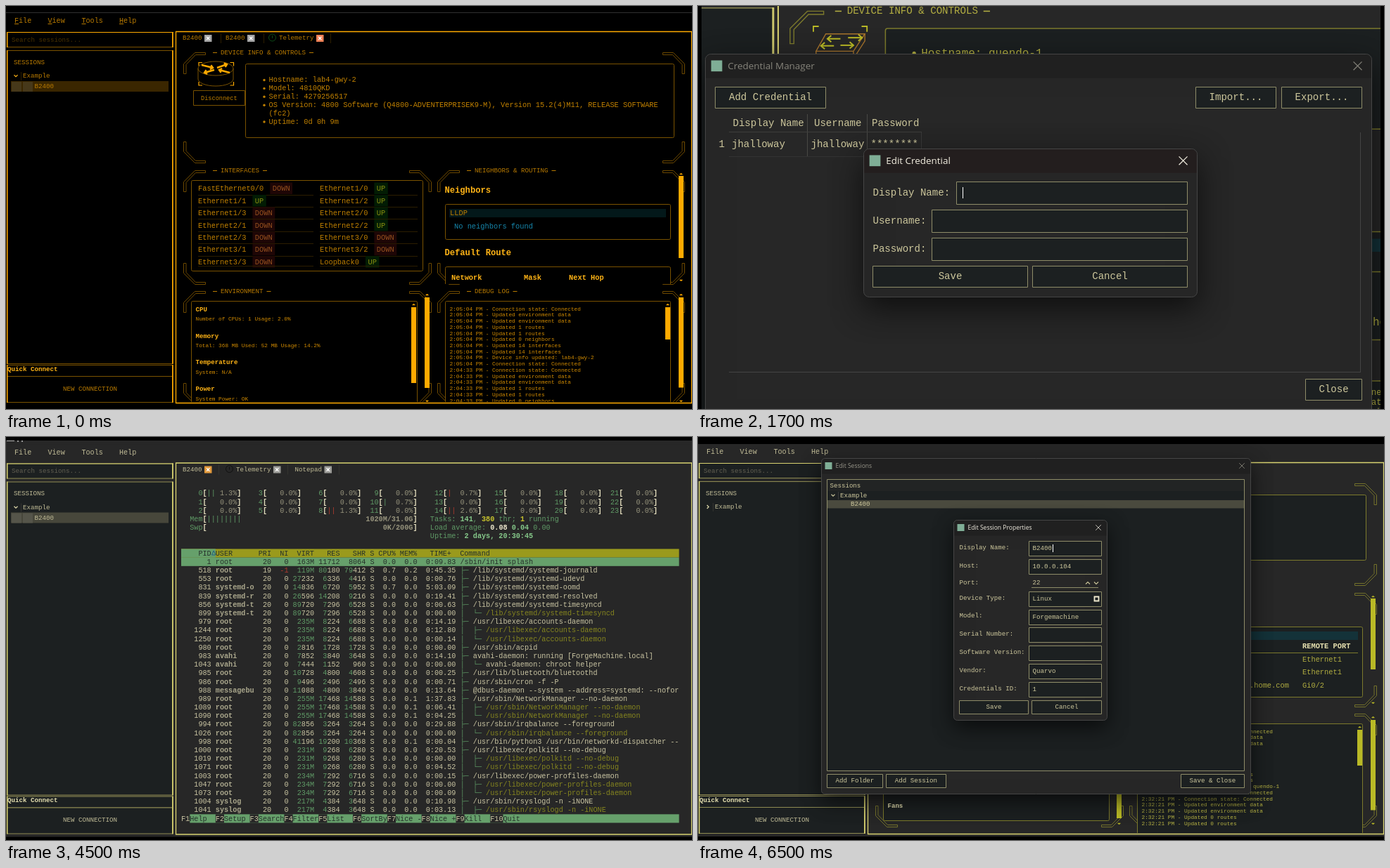
An HTML page with a canvas for the animation above (8 s loop, 975 px wide and 574 px high).

```html
<!DOCTYPE html>
<html lang="en">
<head>
<meta charset="utf-8">
<title>Terminal telemetry</title>
<style>
html, body { margin: 0; width: 100%; height: 100%; overflow: hidden; background: #000; }
canvas { display: block; }
</style>
</head>
<body>
<canvas id="stage" width="975" height="574"></canvas>
<script>
const ctx = document.getElementById('stage').getContext('2d');
const MONO = '"Liberation Mono", "Courier New", monospace';
const SANS = '"Open Sans", "Noto Sans", sans-serif';

const amber = { bg: '#000', panel: '#000', frame: '#ffaa00', soft: '#7a5200', accent: '#ffaa00', dim: '#7a5200', faint: '#2c1e00',
  title: '#b87a00', text: '#b87a00', body: '#c08000', small: '#d08a00', bold: '#ffb416', hint: '#4a3200', sel: '#3a2600', selBox: '#46381a',
  strip: '#03181a', up: '#8a9010', upBg: '#021c04', down: '#96501f', downBg: '#1e0606' };
const cyan = { bg: '#000', panel: '#000', frame: '#1fc4dc', soft: '#0f6473', accent: '#22d3ee', dim: '#0f6473', faint: '#06303a',
  title: '#1590a4', text: '#1590a4', body: '#1698ac', small: '#1aa8bf', bold: '#25d6f0', hint: '#0a4650',
  strip: '#041c20', up: '#14887e', upBg: '#031a06' };
const dark = { bg: '#272727', panel: '#1c2021', frame: '#d8d270', soft: '#8e8b52', accent: '#b9b926', dim: '#7c7a2c', faint: '#343430',
  title: '#b3ae42', text: '#c0bb96', body: '#b0ac40', small: '#b8b444', bold: '#e6e0b0', hint: '#625f52', sel: '#47473b', selBox: '#55554a',
  strip: '#143239' };

function text(s, x, y, color, size = 10.37, style = '') {
  ctx.font = `${style} ${size}px ${MONO}`;
  ctx.fillStyle = color;
  ctx.fillText(s, x, y + size * 0.31);
}
const bold = (s, x, y, color, size) => text(s, x, y, color, size, 'bold');

function rect(x, y, x2, y2, color) {
  ctx.fillStyle = color;
  ctx.fillRect(x, y, x2 - x, y2 - y);
}
function box(x, y, x2, y2, stroke, fill, r = 0, w = 1) {
  ctx.beginPath();
  ctx.roundRect(x + 0.5, y + 0.5, x2 - x - 1, y2 - y - 1, r);
  if (fill) { ctx.fillStyle = fill; ctx.fill(); }
  ctx.strokeStyle = stroke;
  ctx.lineWidth = w;
  ctx.stroke();
}
function path(points, color, w = 1, closed = false, fill) {
  ctx.beginPath();
  points.forEach(([x, y]) => ctx.lineTo(x, y));
  if (closed) ctx.closePath();
  if (fill) { ctx.fillStyle = fill; ctx.fill(); }
  ctx.strokeStyle = color;
  ctx.lineWidth = w;
  ctx.stroke();
}
const hline = (x, x2, y, color) => rect(x, y, x2, y + 1, color);
const vline = (x, y, y2, color) => rect(x, y, x + 1, y2, color);
function cross(x, y, r, color, w = 1) {
  path([[x - r, y - r], [x + r, y + r]], color, w);
  path([[x - r, y + r], [x + r, y - r]], color, w);
}
function chevron(x, y, dir, color, r = 2.5) {
  const h = r / 2;
  path(dir === 'right' ? [[x - h, y - r], [x + h, y], [x - h, y + r]]
    : dir === 'up' ? [[x - r, y + h], [x, y - h], [x + r, y + h]]
    : [[x - r, y - h], [x, y + h], [x + r, y - h]], color, 1.1);
}
function clipped(x, y, x2, y2, draw) {
  ctx.save();
  ctx.beginPath();
  ctx.rect(x, y, x2 - x, y2 - y);
  ctx.clip();
  draw();
  ctx.restore();
}

// Soft frame with bright upright sides
function frame(x, y, x2, y2, t) {
  box(x, y, x2, y2, t.soft, t.panel);
  rect(x, y, x + 1.5, y2, t.frame);
  rect(x2 - 2, y, x2 - 0.5, y2, t.frame);
}

// Panel with double-line cut corners and a dashed title
function panel(x, y, x2, y2, title, t) {
  const shape = [[0, 30], [0, 16], [16, 0], [31, 0], [31, 3], [17, 3], [3.5, 17], [3.5, 30]];
  for (const [cx, sx] of [[x, 1], [x2, -1]])
    for (const [cy, sy] of [[y, 1], [y2, -1]])
      path(shape.map(([a, b]) => [cx + sx * a + 0.5, cy + sy * b + 0.5]), t.dim, 0.9, true);
  const w = title.length * 5.5, tx = x + 53;
  rect(tx - 12, y - 5, tx + w + 12, y + 5, t.bg);
  text(title, tx, y, t.title, 9.17);
  hline(tx - 11, tx - 5, y, t.title);
  hline(tx + w + 5, tx + w + 11, y, t.title);
}
function scroll(x, y, y2, t, up, down) {
  rect(x, y, x + 7, y2, t.accent);
  const tri = (cy, s) => path([[x + 1.5, cy + s], [x + 3.5, cy - s], [x + 5.5, cy + s]], t.accent, 0.5, true, t.accent);
  if (up) tri(up, 1);
  if (down) tri(down, -1);
}

function sidebar(t, s) {
  frame(1, 37, 238, 59, t);
  hline(1, 238, 37, t.frame);
  text('Search sessions...', 8, 48, t.hint, 9.17);
  frame(1, 63, 238, 510, t);
  text('SESSIONS', 11, 80, t.text, 9.17);
  chevron(14, 99.5, s.child ? 'down' : 'right', t.bold);
  vline(21, 94, 106, t.faint);
  text('Example', 24, 99.5, t.text, 9.17);
  if (s.selected) {
    rect(7, 107, 231, 122, t.sel);
    rect(8, 108, 22, 122, t.selBox);
    rect(24, 108, 38, 122, t.selBox);
  }
  if (s.child) text('B2400', 40.5, 114.5, t.text, 9.17);
  frame(1, 511, 238, 528, t);
  bold('Quick Connect', 2, 517, t.bold, 9.17);
  frame(1, 527, 238, 565, t);
  text('NEW CONNECTION', 81, 545, t.text, 9.17);
}

// Each tab: label, label x, close button colour, separator x, status dot colour
function tabs(list, t) {
  for (const [label, x, close, end, dot] of list) {
    if (dot) {
      ctx.beginPath();
      ctx.arc(x - 9.5, 45, 5, 0, 7);
      ctx.strokeStyle = dot;
      ctx.lineWidth = 1;
      ctx.stroke();
      vline(x - 10, 42, 46, dot);
    }
    text(label, x, 45.5, t.text, 9.17);
    const cx = x + label.length * 5.5 + 3.5;
    rect(cx, 41, cx + 10.5, 51, close);
    cross(cx + 5.2, 46, 2.2, '#fff', 1.3);
    vline(end, 39, 53, t.faint);
  }
}

function arrow(x, x2, y, color, w) {
  const d = Math.sign(x2 - x) * 3.5;
  path([[x, y], [x2, y]], color, w);
  path([[x2 - d, y - 3], [x2, y], [x2 - d, y + 3]], color, w);
}
function deviceIcon(t, router) {
  for (const [x, sx] of [[274, 1], [323.5, -1]])
    for (const [y, sy] of [[80.5, 1], [113, -1]])
      path([[x, y + sy * 5], [x, y], [x + sx * 5, y]], t.accent, 1.2);
  if (router) {
    ctx.beginPath();
    ctx.ellipse(298, 89, 25, 10, 0, 0, 7);
    ctx.moveTo(273, 89);
    ctx.lineTo(273, 104);
    ctx.ellipse(298, 104, 25, 10, 0, Math.PI, 0, true);
    ctx.lineTo(323, 89);
    ctx.strokeStyle = t.dim;
    ctx.lineWidth = 1;
    ctx.stroke();
    for (const [x, y, x2, y2] of [[278, 84, 294, 88], [300, 88, 314, 83], [296, 91, 282, 95], [318, 95, 303, 91]]) {
      ctx.save();
      ctx.translate(x, y);
      ctx.rotate(Math.atan2(y2 - y, x2 - x));
      arrow(0, Math.hypot(x2 - x, y2 - y), 0, t.accent, 2.4);
      ctx.restore();
    }
    return;
  }
  const edge = t === dark ? '#a8742c' : t.accent;
  path([[285.5, 87.5], [321.5, 87.5], [311, 103.5], [276.5, 103.5]], edge, 0.9, true);
  path([[276.5, 103.5], [276.5, 110.5], [311, 110.5], [321.5, 94], [321.5, 87.5]], edge, 0.9);
  path([[311, 103.5], [311, 110.5]], edge, 0.9);
  arrow(299, 287, 92, t.accent, 1.3);
  arrow(306, 319, 91, t.accent, 1.3);
  arrow(293, 281, 98.5, t.accent, 1.3);
  arrow(299, 311, 98, t.accent, 1.3);
}

function device(t, s) {
  panel(252, 66, 964, 223 + s.shift, 'DEVICE INFO & CONTROLS', t);
  deviceIcon(t, s.router);
  box(266, 120, 340, 142, t.dim, t.panel);
  text('Disconnect', 277, 131, t.body, 8.6);
  box(340, 82, 950, 188 + s.shift, t.dim, t.panel, 2);
  s.info.forEach((line, i) => {
    const y = 105 + i * 11.9;
    if (line[0] !== ' ') {
      ctx.beginPath();
      ctx.arc(367, y + 0.5, 1.7, 0, 7);
      ctx.fillStyle = t.body;
      ctx.fill();
    }
    text(line.trim(), 373.5, y, t.body);
  });
}

function interfaces(t, s) {
  panel(252, 234, 604, 396, 'INTERFACES', t);
  if (!s.ports) return;
  const rows = Math.ceil(s.ports.length / 2);
  box(263, 248, 593, s.portEnd, t.dim, t.panel, 2);
  s.ports.forEach(([name, up], i) => {
    const [x, x2] = s.portCols[i % 2], y = 260 + (i >> 1) * 17.45;
    const bx = x + (name.length + 2) * 6.22, label = up ? 'UP' : 'DOWN';
    text(name, x, y, t.body);
    rect(bx - 3.5, y - 8.5, bx + label.length * 6.22 + 3.5, y + 8, up ? t.upBg : t.downBg);
    text(label, bx, y, up ? t.up : t.down);
    hline(x, x2, Math.round(y + (i >> 1 === rows - 1 ? 5.5 : 8.5)), t.faint);
  });
}

function neighbors(t, s) {
  panel(613, 234, 964, 396, 'NEIGHBORS & ROUTING', t);
  clipped(614, 240, 956, 396, () => {
    bold('Neighbors', 623.5, 262.5, t.bold, 12.13);
    box(624, 282, 945, s.lldpEnd, t.dim, t.panel, 2);
    rect(630, 289, 938, 301, t.strip);
    text('LLDP', 631, 295, t.body);
    s.lldp(t);
    const y = s.lldpEnd + 18.5;
    bold('Default Route', 623.5, y, t.bold, 12.13);
    box(624, Math.round(y + 19), 945, y + 90, t.dim, t.panel, 2);
    [['Network', 633], ['Mask', 736], ['Next Hop', 800]].forEach(([h, x]) => bold(h, x, y + 35, t.bold));
  });
  scroll(956, 242, s.routeBar, t, 239, 391);
}

function logLines(s) {
  const make = time => [
    'Connection state: Connected', ...Array(2).fill('Updated environment data'),
    ...Array(2).fill(`Updated ${s.routes} routes`), ...Array(s.repeat).fill(`Updated ${s.near} neighbors`),
    ...Array(2).fill(`Updated ${s.count} interfaces`), 'Device info updated: ' + s.host, 'Connection state: Connected',
  ].map(m => `${time} PM - ${m}`);
  return s.times.flatMap(make).slice(0, 16);
}

function lowerPanels(t, s) {
  clipped(244, 398, 973, 564 - s.shift, () => {
    panel(252, 406, 604, 567, 'ENVIRONMENT', t);
    panel(613, 406, 964, 567, 'DEBUG LOG', t);
    box(263, 420, 585, s.env ? 600 : 559, t.dim, t.panel, 2);
    if (s.env) {
      s.env.forEach(([head, line], i) => {
        bold(head, 269.5, 432 + i * 37.8, t.bold, 9.07);
        text(line, 269.5, 446 + i * 37.8, t.small, 7.78);
      });
      scroll(576, 429, 537, t, 425);
    } else bold('Fans', 269.5, 537, t.bold, 9.07);
    scroll(595, 415, s.env ? 544 : 555, t, 411, 563);
    box(624, 420, 945, 600, t.dim, t.panel, 2);
    logLines(s).forEach((line, i) => text(line, 630.5, 431.3 + i * 8.72, t.small, 7.78));
    scroll(937, 429, s.logBar, t, 425);
    scroll(956, 415, 543.5, t, 411, 563);
  });
}

function shell(t, s) {
  rect(0, 10, 975, 569, t.bg);
  [['File', 12], ['View', 59.5], ['Tools', 107.5], ['Help', 161]].forEach(([m, x]) => {
    text(m, x, 21, t.text, 10.1);
    if (s.mnemonics) hline(x, x + 6, 25, t.text);
  });
  sidebar(t, s);
  box(241, 36, 975, 566, t.frame, t.bg, 0, 1.3);
  tabs(s.tabs || [], t);
}
function dashboard(t, s) {
  shell(t, s);
  device(t, s);
  ctx.save();
  ctx.translate(0, s.shift);
  interfaces(t, s);
  neighbors(t, s);
  lowerPanels(t, s);
  ctx.restore();
}

const environment = (cpu, total, used, pct) => [
  ['CPU', `Number of CPUs: 1 Usage: ${cpu}%`],
  ['Memory', `Total: ${total} MB Used: ${used} MB Usage: ${pct}%`],
  ['Temperature', 'System: N/A'], ['Power', 'System Power: OK'],
];
const ports = (list, prefix) => list.split(' ').map(p => [prefix + p.slice(0, 3), p[3] === '+']);

const routerView = {
  mnemonics: true, child: true, selected: true, router: true, shift: 0,
  tabs: [['B2400', 251, '#a5a5a5', 305], ['B2400', 312, '#a5a5a5', 366], ['Telemetry', 388, '#f08055', 461, '#0d4d18']],
  info: ['Hostname: lab4-gwy-2', 'Model: 4810QKD', 'Serial: 4279256517',
    'OS Version: 4800 Software (Q4800-ADVENTERPRISEK9-M), Version 15.2(4)M11, RELEASE SOFTWARE', ' (fc2)', 'Uptime: 0d 0h 9m'],
  ports: [['FastEthernet0/0', false], ...ports('1/0+ 1/1+ 1/2+ 1/3- 2/0+ 2/1- 2/2+ 2/3- 3/0- 3/1- 3/2- 3/3-', 'Ethernet'), ['Loopback0', true]],
  portCols: [[273, 437], [446, 585]], portEnd: 378,
  lldpEnd: 333, routeBar: 359, logBar: 475,
  lldp: () => text('No neighbors found', 637, 313.5, '#1686ab'),
  env: environment('2.0', 368, 52, '14.2'),
  times: ['2:05:04', '2:04:33'], routes: 1, near: 0, repeat: 1, count: 14, host: 'lab4-gwy-2',
};
const coreView = {
  child: true, shift: 0,
  tabs: [['Telemetry', 266.5, '#f0906c', 340, '#0d4d18']],
  info: ['Hostname: lab4-main-02', 'Model: KTRm', 'Serial: 9M2G8CK29M4',
    'OS Version: nuos_l2 Software (nuos_l2-ADVENTERPRISEK9-M), Version 15.2(4.0.55)E, TEST',
    ' ENGINEERING ESTG_WEEKLY BUILD, synced to END_OF_FLO_ISP', 'Uptime: 0d 5h 13m'],
  ports: [...ports('0/0+ 0/1+ 0/2+ 0/3+', 'GigabitEthernet'), ['Vlan1', true]],
  portCols: [[273, 425], [433, 585]], portEnd: 309,
  lldpEnd: 346, routeBar: 353, logBar: 475,
  lldp: t => {
    [['LOCAL PORT', 633.5], ['NEIGHBOR', 779.5], ['REMOTE PORT', 849]].forEach(([h, x]) => bold(h, x, 310, t.bold));
    hline(631, 938, 319, t.dim);
    [['GigabitEthernet0/2', 633.5], ['quendo-1', 779.5], ['Ethernet1', 849]].forEach(([h, x]) => text(h, x, 328.5, t.body));
  },
  env: environment('0.0', 402, 106, '26.4'),
  times: ['7:07:59', '7:07:28'], routes: 1, near: 1, repeat: 2, count: 5, host: 'lab4-main-02',
};
const switchView = {
  shift: -12,
  info: ['Hostname: quendo-1'],
  lldpEnd: 383, routeBar: 343, logBar: 480,
  lldp: t => {
    bold('REMOTE PORT', 859, 310, t.bold);
    hline(631, 938, 319, t.dim);
    ['Ethernet1', 'Ethernet1', 'Gi0/2'].forEach((p, i) => text(p, 859, 328.5 + i * 18.7, t.body));
    text('.home.com', 784, 366, t.body);
  },
  times: ['2:32:52', '2:32:21'], routes: 0, near: 3, repeat: 2, count: 14, host: 'quendo-1',
};

// Process viewer on a character grid
const GREEN = '#5f9a66', LIME = '#86c98a', OLIVE = '#85851f', PLAIN = '#c9c4a2', INK = '#25302a', RED = '#b03a2e', YELLOW = '#c9c52e';
const gx = col => 249 + col * 6.1, gy = row => 80.2 + row * 12.19;
const cell = (s, col, row, color, style) => text(s, gx(col), gy(row), color, 10.17, style);
function run(col, row, parts) {
  for (const [s, color, style] of parts) {
    cell(s, col, row, color, style);
    col += s.length;
  }
}
const band = (col, end, row, color) => rect(gx(col), gy(row) - 6.1, gx(end), gy(row) + 6.1, color);

const PROCS = `1 root 163M 11712 8064 0.0 0.0 0:09.83 - /sbin/init splash
518 root 119M 80180 79412 0.7 0.2 0:45.35 0 /lib/systemd/systemd-journald
553 root 27232 6336 4416 0.0 0.0 0:00.76 0 /lib/systemd/systemd-udevd
831 systemd-o 14836 6720 5952 0.7 0.0 5:03.09 0 /lib/systemd/systemd-oomd
839 systemd-r 26596 14208 9216 0.0 0.0 0:19.41 0 /lib/systemd/systemd-resolved
856 systemd-t 89720 7296 6528 0.0 0.0 0:00.63 0 /lib/systemd/systemd-timesyncd
899 systemd-t 89720 7296 6528 0.0 0.0 0:00.00 2 /lib/systemd/systemd-timesyncd
979 root 235M 8224 6688 0.0 0.0 0:14.19 0 /usr/libexec/accounts-daemon
1244 root 235M 8224 6688 0.0 0.0 0:12.80 1 /usr/libexec/accounts-daemon
1250 root 235M 8224 6688 0.0 0.0 0:00.14 2 /usr/libexec/accounts-daemon
980 root 2816 1728 1728 0.0 0.0 0:00.00 0 /usr/sbin/acpid
983 avahi 7852 3840 3648 0.0 0.0 0:14.10 0 avahi-daemon: running [ForgeMachine.local]
1043 avahi 7444 1152 960 0.0 0.0 0:00.00 3 avahi-daemon: chroot helper
985 root 10728 4800 4608 0.0 0.0 0:00.25 0 /usr/lib/bluetooth/bluetoothd
986 root 9496 2496 2496 0.0 0.0 0:00.71 0 /usr/sbin/cron -f -P
988 messagebu 11088 4800 3840 0.0 0.0 0:13.64 0 @dbus-daemon --system --address=systemd: --nofor
989 root 255M 17468 14588 0.0 0.1 1:37.83 0 /usr/sbin/NetworkManager --no-daemon
1089 root 255M 17468 14588 0.0 0.1 0:06.41 1 /usr/sbin/NetworkManager --no-daemon
1090 root 255M 17468 14588 0.0 0.1 0:04.25 2 /usr/sbin/NetworkManager --no-daemon
994 root 82856 3264 3264 0.0 0.0 0:29.88 0 /usr/sbin/irqbalance --foreground
1026 root 82856 3264 3264 0.0 0.0 0:00.00 2 /usr/sbin/irqbalance --foreground
998 root 41196 19200 10368 0.0 0.1 0:00.04 0 /usr/bin/python3 /usr/bin/networkd-dispatcher --
1000 root 231M 9268 6280 0.0 0.0 0:20.53 0 /usr/libexec/polkitd --no-debug
1019 root 231M 9268 6280 0.0 0.0 0:00.00 1 /usr/libexec/polkitd --no-debug
1071 root 231M 9268 6280 0.0 0.0 0:04.52 2 /usr/libexec/polkitd --no-debug
1003 root 234M 7292 6716 0.0 0.0 0:00.15 0 /usr/libexec/power-profiles-daemon
1047 root 234M 7292 6716 0.0 0.0 0:00.00 1 /usr/libexec/power-profiles-daemon
1073 root 234M 7292 6716 0.0 0.0 0:00.09 2 /usr/libexec/power-profiles-daemon
1004 syslog 217M 4384 3648 0.0 0.0 0:10.98 0 /usr/sbin/rsyslogd -n -iNONE
1041 syslog 217M 4384 3648 0.0 0.0 0:03.13 1 /usr/sbin/rsyslogd -n -iNONE`.split('\n');
const TREE = { '-': '', 0: '├─ ', 1: '│  ├─ ', 2: '│  └─ ', 3: '│  └─ ' };

function processRow(line, i) {
  const [pid, user, virt, res, shr, cpu, mem, time, kind, ...cmd] = line.split(' ');
  const row = i + 8, picked = i === 0, nice = pid === '518', ink = c => picked ? INK : c;
  const right = (s, end, c) => cell(s, end - s.length, row, ink(c));
  if (picked) band(0, 116, row, '#66a06b');
  right(pid, 7, PLAIN);
  cell(user, 8, row, ink('#aaa78c'), picked ? '' : 'bold');
  right(nice ? '19' : '20', 21, PLAIN);
  right(nice ? '-1' : '0', 25, nice ? RED : PLAIN);
  [[virt, 31], [res, 37], [shr, 43]].forEach(([s, end]) => {
    const cut = s.endsWith('M') ? s.length : Math.max(0, s.length - 3);
    run(end - s.length, row, [[s.slice(0, cut), ink(GREEN)], [s.slice(cut), ink(PLAIN)]]);
  });
  cell('S', 44, row, ink(PLAIN));
  right(cpu, 50, PLAIN);
  right(mem, 55, PLAIN);
  right(time, 64, PLAIN);
  run(65, row, [[TREE[kind], GREEN], [cmd.join(' '), ink(kind === '1' || kind === '2' ? OLIVE : PLAIN)]]);
}

function processes() {
  const busy = { 0: ['1.3', '||', GREEN], 8: ['1.3', '||', RED], 10: ['0.7', '|', GREEN], 12: ['0.7', '|', RED], 14: ['2.6', '||', RED] };
  const open = [5, 19, 33, 46, 61, 75, 89, 102];
  for (let i = 0; i < 24; i++) {
    const [pct, bars, color] = busy[i] || ['0.0', '', GREEN], col = open[Math.floor(i / 3)], row = i % 3;
    cell(String(i), col - String(i).length, row, GREEN);
    cell('[', col, row, '#e6e0c0', 'bold');
    cell(bars, col + 1, row, color);
    cell(pct + '%', col + 4, row, '#96937c');
    cell(']', col + 8, row, '#e6e0c0', 'bold');
  }
  [['Mem', '||||||||', '1020M/31.0G'], ['Swp', '', '0K/200G']].forEach(([name, bars, use], i) => {
    run(2, 3 + i, [[name, GREEN], ['[', '#e6e0c0', 'bold'], [bars, GREEN]]);
    run(54 - use.length, 3 + i, [[use, '#96937c', 'bold'], [']', '#e6e0c0', 'bold']]);
  });
  run(58, 3, [['Tasks: ', GREEN], ['141', LIME, 'bold'], [', ', GREEN], ['380', YELLOW, 'bold'], [' thr; ', GREEN], ['1', YELLOW, 'bold'], [' running', GREEN]]);
  run(58, 4, [['Load average: ', GREEN], ['0.08 ', '#f0ead0', 'bold'], ['0.04 ', LIME, 'bold'], ['0.00', GREEN]]);
  run(58, 5, [['Uptime: ', GREEN], ['2 days, 20:30:45', LIME, 'bold']]);

  band(0, 116, 7, '#9a9a1c');
  band(0, 8, 7, '#66a06b');
  cell('    PID USER      PRI  NI  VIRT   RES   SHR S CPU% MEM%   TIME+  Command', 0, 7, INK);
  path([[292.5, 168], [295.2, 162], [298, 168]], '#1d5f86', 1, true);
  PROCS.forEach(processRow);

  band(2, 116, 38, '#66a06b');
  ['Help', 'Setup', 'Search', 'Filter', 'List', 'SortBy', 'Nice -', 'Nice +', 'Kill', 'Quit'].forEach((label, i) => {
    const key = 'F' + (i + 1);
    band(i * 8, i * 8 + key.length, 38, dark.bg);
    run(i * 8, 38, [[key, PLAIN], [label, INK]]);
  });
}

// Windows dialogs
const LINE = '#8e8c68', CREAM = '#cdc79c';
function dialog(x, y, x2, y2, title, size, color, bar) {
  const k = size / 8.55;
  ctx.save();
  ctx.shadowColor = 'rgba(0,0,0,.6)';
  ctx.shadowBlur = 28 * k;
  ctx.shadowOffsetY = 10 * k;
  box(x, y, x2, y2, '#454545', '#272727', 5 * k);
  ctx.restore();
  ctx.beginPath();
  ctx.roundRect(x + 1, y + 1, x2 - x - 2, 21.5 * k, [5 * k, 5 * k, 0, 0]);
  ctx.fillStyle = bar;
  ctx.fill();
  rect(x + 5.5 * k, y + 6 * k, x + 15.5 * k, y + 16 * k, '#7fae96');
  ctx.font = `${size}px ${SANS}`;
  ctx.fillStyle = color;
  ctx.fillText(title, x + 20.5 * k, y + 11 * k + size * 0.36);
  cross(x2 - 13 * k, y + 11 * k, 3.8 * k, color, 0.75 * k);
}
function button(label, x, y, x2, y2, size) {
  box(x, y, x2, y2, LINE, '#1c2021');
  text(label, (x + x2 - label.length * size * 0.6) / 2, (y + y2) / 2 - 0.5, CREAM, size);
}

function credentials() {
  const big = 14.05, field = (x, y) => box(x, y, 696, y + 33, LINE, '#1c2021');
  ctx.save();
  ctx.translate(-258, -95);
  ctx.scale(1.54, 1.54);
  dashboard(dark, switchView);
  ctx.restore();
  rect(0, 0, 5, 574, '#000');
  rect(970, 0, 975, 574, '#000');
  dialog(10, 68, 958, 590, 'Credential Manager', 13.45, '#85837a', '#202020');
  button('Add Credential', 24, 115, 182, 146, big);
  button('Import...', 707, 115, 822, 146, big);
  button('Export...', 829, 115, 944, 146, big);
  [['Display Name', 49.5], ['Username', 165], ['Password', 247]].forEach(([h, x]) => text(h, x, 166.5, CREAM, big));
  [155, 240].forEach(x => vline(x, 154, 214, '#484844'));
  vline(317, 180, 214, '#3a3a3a');
  hline(44, 318, 179, '#3e3e3c');
  hline(44, 318, 214, '#333');
  vline(941, 180, 522, '#444');
  hline(44, 942, 521, '#444');
  text('1', 29.5, 197, CREAM, big);
  [['jhalloway', 48], ['jhalloway', 160.5], ['********', 245.5]].forEach(([s, x]) => text(s, x, 196.5, CREAM, big));
  button('Close', 863, 531, 944, 562, big);

  dialog(235, 203, 710, 415, 'Edit Credential', 13.45, '#f2eee0', '#231e1e');
  [['Display Name:', 266, 367, 250], ['Username:', 306, 332, 290], ['Password:', 346, 332, 330]].forEach(([s, y, fx, fy]) => {
    text(s, 248.5, y, CREAM, big);
    field(fx, fy);
  });
  vline(376, 258, 274, '#fff');
  button('Save', 248, 370, 469, 401, big);
  button('Cancel', 475, 370, 696, 401, big);
}

function sessionEditor() {
  const size = 9.15;
  dashboard(dark, switchView);
  dialog(175, 30, 786, 509, 'Edit Sessions', 8.55, '#98968a', '#202020');
  box(183, 60, 777, 476, LINE, '#1c2021');
  rect(184, 61, 776, 77, '#222424');
  text('Sessions', 187.5, 69, CREAM, size);
  chevron(192, 83, 'down', CREAM);
  vline(199, 78, 89, '#3a3a3a');
  text('Example', 202, 83, CREAM, size);
  rect(184, 90, 776, 101.5, '#4a4a3e');
  text('B2400', 217, 95.5, CREAM, size);
  button('Add Folder', 183, 480, 263, 500, size);
  button('Add Session', 267, 480, 353, 500, size);
  button('Save & Close', 686, 480, 777, 500, size);

  dialog(363, 118, 582, 404, 'Edit Session Properties', 8.55, '#f0ece0', '#202020');
  [['Display Name:', 157, 148, 'B2400'], ['Host:', 183, 174, '10.0.0.104'], ['Port:', 207.5, 0, '22'],
    ['Device Type:', 229, 220, 'Linux'], ['Model:', 254.5, 246, 'Forgemachine'], ['Serial Number:', 280.5, 271, ''],
    ['Software Version:', 306.5, 297, ''], ['Vendor:', 332, 323, 'Quarvo'], ['Credentials ID:', 358, 349, '1']].forEach(([label, y, top, value]) => {
    text(label, 371.5, y, CREAM, size);
    if (top) box(470, top, 574, top + 22, LINE, '#1c2021');
    text(value, 475.5, top ? top + 10.5 : y, CREAM, size);
  });
  vline(504, 153, 164, '#fff');
  hline(474, 569, 214, LINE);
  chevron(554, 208, 'up', CREAM, 3);
  chevron(566, 208, 'down', CREAM, 3);
  box(563, 227, 570, 234, '#f0ead0', null, 0, 1.8);
  button('Save', 371, 375, 470, 395, size);
  button('Cancel', 474, 375, 574, 395, size);
}

function terminal() {
  shell(dark, {
    child: true, selected: true,
    tabs: [['B2400', 251, '#e39a3c', 302], ['Telemetry', 327, '#9c9c98', 400, '#111'], ['Notepad', 410.5, '#9c9c98', 473]],
  });
}
function shifted(draw) {
  ctx.save();
  ctx.translate(0, 0.5);
  draw();
  ctx.restore();
}

const scenes = [
  [500, () => { dashboard(amber, routerView); hline(0, 975, 9, '#303030'); }],
  [2500, credentials],
  [4500, () => {
    shifted(() => dashboard(cyan, coreView));
    rect(0, 7, 975, 10, '#252525');
    [17, 22].forEach(x => rect(x, 6, x + 2, 7, '#999'));
  }],
  [6500, () => {
    rect(0, 5, 975, 569, dark.bg);
    shifted(terminal);
    processes();
    rect(1, 5, 12, 6, '#bbb');
    [16, 22].forEach(x => rect(x, 5, x + 2, 7, '#999'));
  }],
  [8000, sessionEditor],
];

let shown = -1;
function tick(now) {
  const time = now % 8000, index = scenes.findIndex(([end]) => time < end);
  if (index !== shown) {
    shown = index;
    rect(0, 0, 975, 574, '#000');
    scenes[index][1]();
  }
  requestAnimationFrame(tick);
}
tick(0);
</script>
</body>
</html>
```
